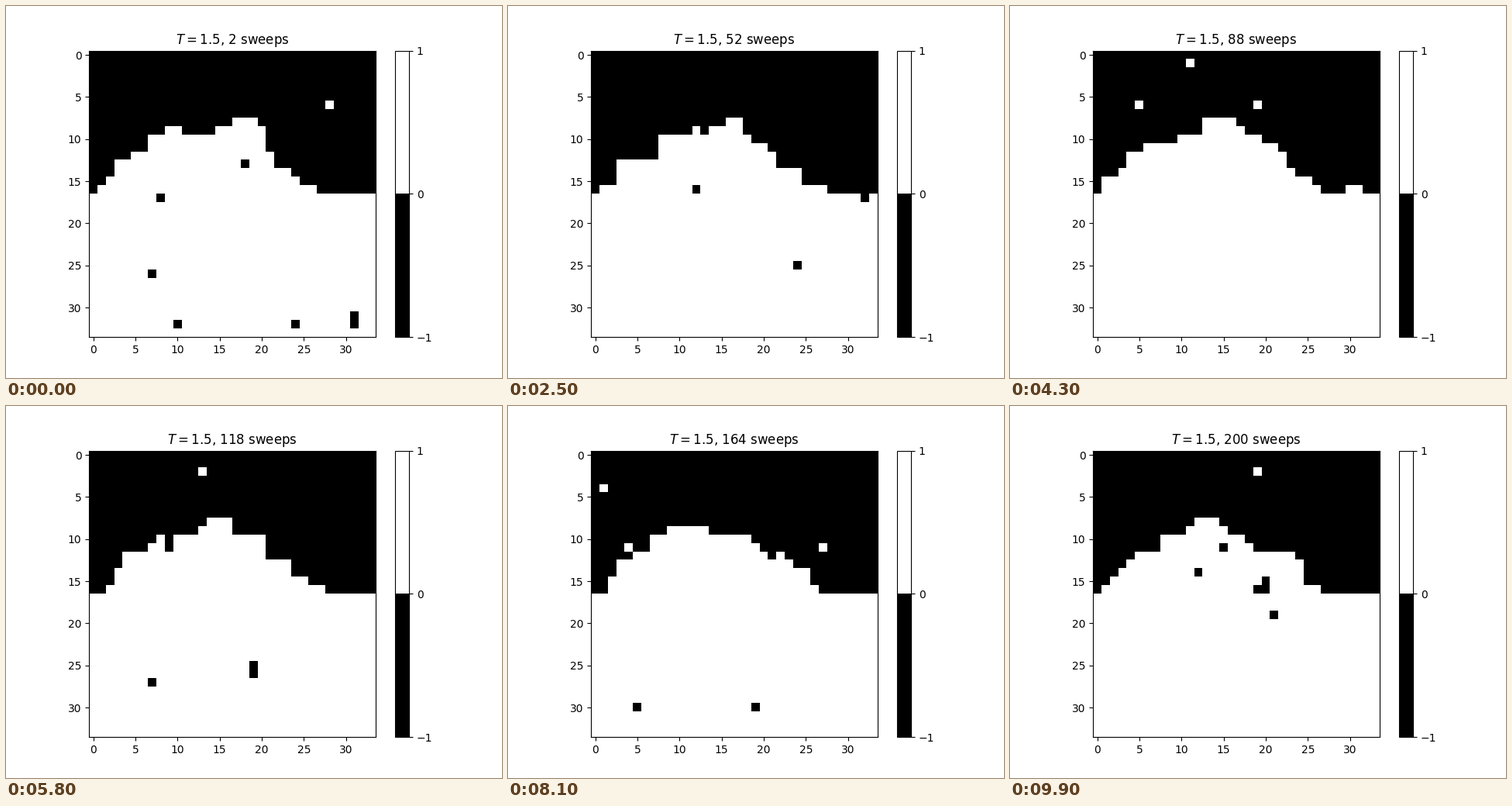
These frames come from a looping animation (640 px wide and 480 px high, 10 s). A matplotlib script:

```python
import matplotlib.pyplot as plt
import numpy as np
from matplotlib.animation import FuncAnimation
from matplotlib.colors import ListedColormap

SIZE, FRAMES, TEMP, WALL = 34, 100, 1.5, 17
PULL, REACH = 0.6, 5

rows, cols = np.indices((SIZE, SIZE))
border = (rows % (SIZE - 1) == 0) | (cols % (SIZE - 1) == 0)
checker = [~border & ((rows + cols) % 2 == parity) for parity in (0, 1)]


def depth(frame):
    """Distance below a broad hill whose narrow peak sways to the left."""
    peak = 16 - 0.04 * frame + 2 * np.cos(2 * np.pi * frame / 55)
    hill = 7 * np.exp(-((cols - 13.5) / 10.5) ** 4)
    tip = 2.5 * np.exp(-((cols - peak) / 2.5) ** 2)
    return rows + 0.5 - (WALL - hill - tip)


def sweep(spins, field, rng):
    """One Metropolis sweep with fixed borders."""
    for cells in checker:
        near = sum(np.roll(spins, d, axis) for d in (1, -1) for axis in (0, 1))
        cost = 2 * spins * (near + field)
        accept = rng.random(spins.shape) < np.exp(-np.maximum(cost, 0) / TEMP)
        spins[cells & accept] *= -1


def simulate():
    rng = np.random.default_rng(7)
    below = np.where(border, rows >= WALL, depth(0) > 0)
    spins = np.where(below, 1, -1)
    history = []
    for frame in range(FRAMES):
        d = depth(frame)
        field = PULL * np.sign(d) * (np.abs(d) < REACH)
        for _ in range(2):
            sweep(spins, field, rng)
        history.append(spins.copy())
    return history


history = simulate()
fig, ax = plt.subplots(figsize=(6.4, 4.8), dpi=100)
image = ax.imshow(history[0], cmap=ListedColormap(["black", "white"]),
                  vmin=-1, vmax=1, interpolation="nearest")
fig.colorbar(image, ax=ax, ticks=[-1, 0, 1])
title = ax.set_title("")


def update(frame):
    image.set_data(history[frame])
    title.set_text(f"$T = {TEMP}$, {2 * (frame + 1)} sweeps")
    return image, title


anim = FuncAnimation(fig, update, frames=FRAMES, interval=100,
                     repeat=True, repeat_delay=0)
plt.show()
```
